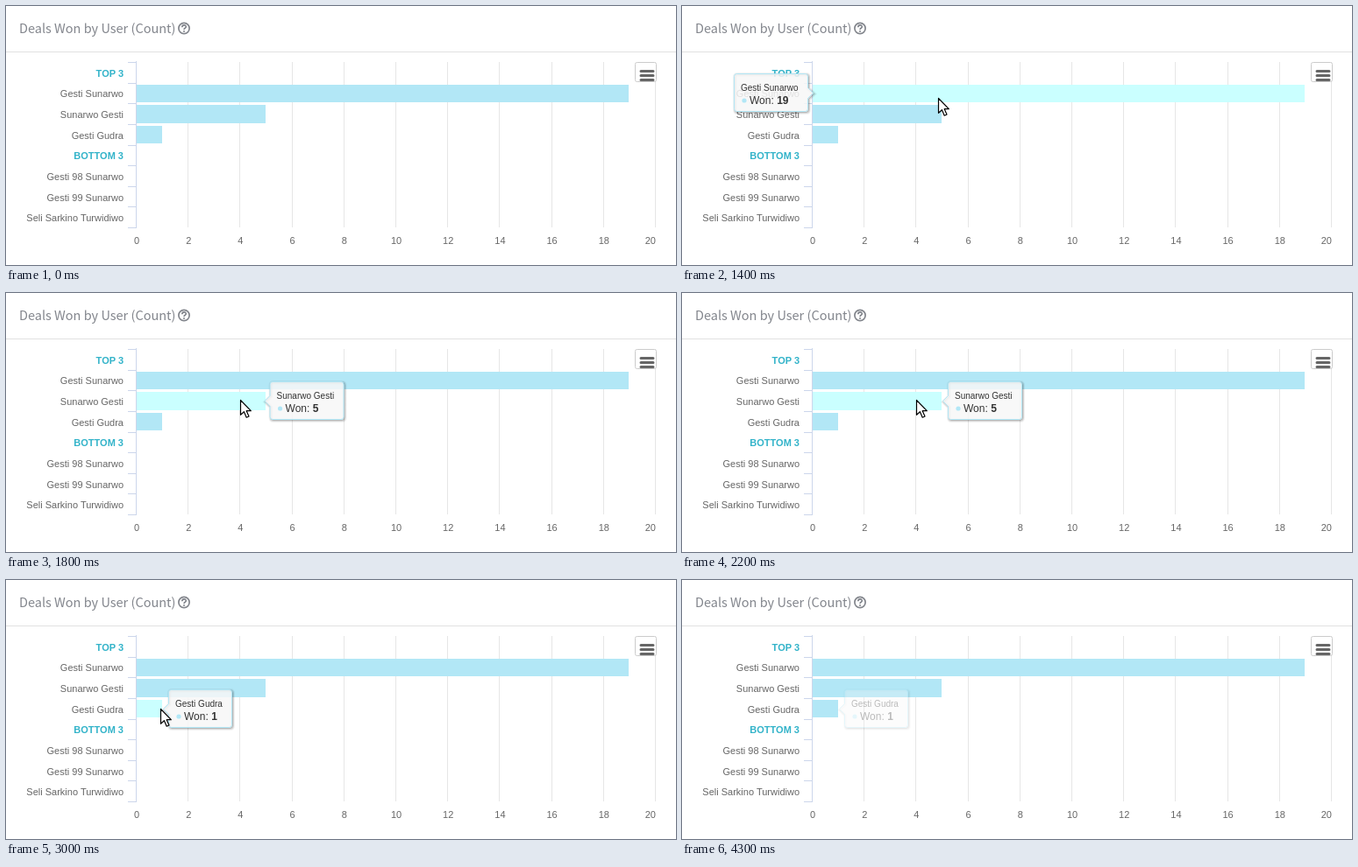
An HTML page that plays this animation: 764 px wide and 296 px high, repeating every 4400 ms.

```html
<!DOCTYPE html>
<html lang="en">
<head>
<meta charset="utf-8">
<title>Deals Won by User</title>
<style>
  html, body { margin: 0; width: 100%; height: 100%; overflow: hidden; background: #fff; }
  svg { display: block; width: 764px; height: 296px; font: 11px "Liberation Sans", Arial, sans-serif; fill: #666; }
  .title { font: 14.5px "Noto Sans CJK SC", "Noto Sans CJK JP", "Noto Sans", sans-serif; fill: #82858c; }
  .group { font-weight: bold; fill: #32b3c9; }
  .end { text-anchor: end; }
  .mid { text-anchor: middle; }
  .grid { stroke: #e6e6e6; }
  .axis { stroke: #ccd6eb; }
  #tip { fill: #333; font-size: 12px; }
  #tip .shadow { fill: none; stroke: #000; }
  #box { fill: #f7f7f7; fill-opacity: .85; stroke: #b2e7f6; }
  #head { font-size: 10px; }
  .cursor { fill: #fff; stroke: #000; stroke-width: 1.2; stroke-linejoin: round; }
</style>
</head>
<body>
<svg viewBox="0 0 764 296">
  <text class="title" x="15" y="31">Deals Won by User (Count)</text>
  <g fill="none" stroke="#82858c" stroke-width="1.7">
    <circle cx="203" cy="25.5" r="6.1"/>
    <path d="M200.8 24.2C200.9 21.2 205.3 21.3 205.3 23.8C205.3 25.3 203 25.2 203 27"/>
    <path d="M203 28v1.7"/>
  </g>
  <path d="M0 52.5H764" stroke="#e1e1e1"/>
  <g id="chart"></g>
  <rect x="717.5" y="64.5" width="24" height="22" rx="2" fill="#fff" stroke="#ccc"/>
  <path d="M724 74.5h14M724 79.5h14M724 84.5h14" stroke="#666" stroke-width="3" stroke-linecap="round"/>
  <g id="tip">
    <path class="shadow" stroke-width="5" stroke-opacity=".05" transform="translate(1 1)"/>
    <path class="shadow" stroke-width="3" stroke-opacity=".1" transform="translate(1 1)"/>
    <path class="shadow" stroke-width="1" stroke-opacity=".15" transform="translate(1 1)"/>
    <path id="box"/>
    <text id="head" x="7.5" y="19.5"></text>
    <circle cx="11.5" cy="30.5" r="2.6" fill="#b2e7f6"/>
    <text x="17.5" y="34.5">Won: <tspan id="won" font-weight="bold"></tspan></text>
  </g>
  <path id="arrow" class="cursor" d="M.5 .5V17.3L4.4 13.7L7.2 20.2L10 19L7.2 12.7H12.3Z"/>
  <g id="fist" class="cursor">
    <path d="M-4.5 6.3V4.5L-6.8 2Q-7.6 -1.2 -4.8 -1V-3.5Q-4.8 -5.5 -2.4 -5.2Q0 -6.8 1.8 -5.2Q3.6 -6 4.6 -4.2Q7.4 -4 7.4 -1.5V2L6 4.5V6.3Z"/>
    <path d="M-2 -1v1.5M1 -1v1.5M4 -1v1.5" stroke-width=".9"/>
  </g>
</svg>
<script>
const LOOP = 4400, STEP = 100;
const $ = id => document.getElementById(id);
const chart = $('chart');

function add(tag, attrs, text = '') {
  const el = document.createElementNS('http://www.w3.org/2000/svg', tag);
  for (const k in attrs) el.setAttribute(k, attrs[k]);
  el.textContent = text;
  return chart.appendChild(el);
}
const line = (cls, d) => add('path', { class: cls, d });

// Chart
const rows = ['TOP 3', 'Gesti Sunarwo', 'Sunarwo Gesti', 'Gesti Gudra', 'BOTTOM 3',
  'Gesti 98 Sunarwo', 'Gesti 99 Sunarwo', 'Seli Sarkino Turwidiwo'];
const won = [19, 5, 1];
const UNIT = 29.6, ROW = 23.65;

for (let v = 0; v <= 20; v += 2) {
  const x = 148.5 + v * UNIT;
  if (v) line('grid', `M${Math.floor(x) + .5} 64V253`);
  add('text', { class: v < 20 ? 'mid' : 'end', x: v < 20 ? x + .5 : 741, y: 272 }, v);
}
const bars = won.map((n, i) => add('rect', {
  x: 149, y: [90, 113, 137][i], width: Math.round(n * UNIT - 1), height: i == 1 ? 21 : 20
}));
line('axis', 'M148.5 63V254');
for (let i = 0; i <= 8; i++) line('axis', `M139 ${Math.round(63.9 + i * ROW) + .5}H149`);
rows.forEach((name, i) => add('text', {
  class: i % 4 ? 'end' : 'end group', x: 134, y: Math.round(80.8 + i * ROW)
}, name));

// Tooltip resting places: box corner, width, anchor
const tips = [
  { x: 59.5, y: 77.5, w: 84, ax: 150.5, ay: 99.5 },
  { x: 303.5, y: 101.5, w: 84, ax: 297.5, ay: 123.5 },
  { x: 185.5, y: 125.5, w: 72, ax: 179.5, ay: 147.5 }
];
// Time the tooltip sets off for each bar
const starts = [400, 1436, 2590];
// Spans in which each bar is lit
const lit = [[400, 1436], [1436, 2300], [2590, 3500]];

// Pointer path: time, x, y
const path = [[200, 264, 4], [300, 282, 55], [400, 294, 91], [500, 298, 101], [1300, 298, 101],
  [1400, 292, 105], [1500, 277, 117], [1600, 270, 121], [1700, 267, 122], [2200, 267, 122],
  [2300, 228, 135], [2400, 190, 143], [2500, 190, 143], [2600, 177, 147], [2700, 176, 147],
  [3300, 176, 147], [3400, 162, 146], [3500, 136, 138], [3600, 118, 108], [3700, 104, 58],
  [3800, 95, 17], [3900, 101, 7]];

const clamp = v => Math.max(0, Math.min(1, v));
const mix = (a, b, f) => a + (b - a) * f;

function pointer(t) {
  const i = Math.max(1, path.findIndex(p => p[0] >= t));
  const a = path[i - 1], b = path[i], f = clamp((t - a[0]) / (b[0] - a[0]));
  return [mix(a[1], b[1], f), mix(a[2], b[2], f)];
}

// Each 32 ms the box covers a third of the way across and half of the way down
function tooltip(t) {
  const i = Math.max(0, starts.filter(s => s <= t).length - 1);
  const to = tips[i], from = tips[i - 1] || to;
  const n = Math.max(0, t - starts[i]) / 32;
  const near = n > 12.5;
  const fx = near ? 1 : 1 - (2 / 3) ** n, fy = near ? 1 : 1 - .5 ** n;
  return {
    i, w: to.w,
    x: mix(from.x, to.x, fx), y: mix(from.y, to.y, fy), ay: mix(from.ay, to.ay, fy),
    right: i == 0 || (i == 1 && n < 4)
  };
}

function outline(w, h, ay, right) {
  const r = right ? `V${ay - 6}l6 6l-6 6` : '';
  const l = right ? '' : `V${ay + 6}l-6 -6l6 -6`;
  return `M3 0H${w - 3}q3 0 3 3${r}V${h - 3}q0 3 -3 3H3q-3 0 -3 -3${l}V3q0 -3 3 -3Z`;
}

const show = (el, on) => el.setAttribute('visibility', on ? 'visible' : 'hidden');
const place = (el, x, y) => el.setAttribute('transform', `translate(${x} ${y})`);

function draw(t) {
  bars.forEach((bar, i) => {
    const on = t >= lit[i][0] && t < lit[i][1];
    bar.setAttribute('fill', on ? '#caffff' : '#b2e7f6');
  });

  const tip = tooltip(t), d = outline(tip.w, 43, tip.ay - tip.y, tip.right);
  place($('tip'), tip.x, tip.y);
  document.querySelectorAll('#tip path').forEach(p => p.setAttribute('d', d));
  $('head').textContent = rows[tip.i + 1];
  $('won').textContent = won[tip.i];
  $('tip').setAttribute('opacity', Math.min(clamp((t - 350) / 250), clamp((4380 - t) / 240)));

  const [x, y] = pointer(Math.min(t, 3900));
  const seen = t >= 200 && t < 4000, fist = t >= 3750;
  place($('arrow'), x, y);
  place($('fist'), x, y);
  show($('arrow'), seen && !fist);
  show($('fist'), seen && fist);
}

const begin = performance.now();
function tick() {
  const t = (performance.now() - begin) % LOOP;
  draw(Math.floor(t / STEP) * STEP);
  requestAnimationFrame(tick);
}
tick();
</script>
</body>
</html>
```
